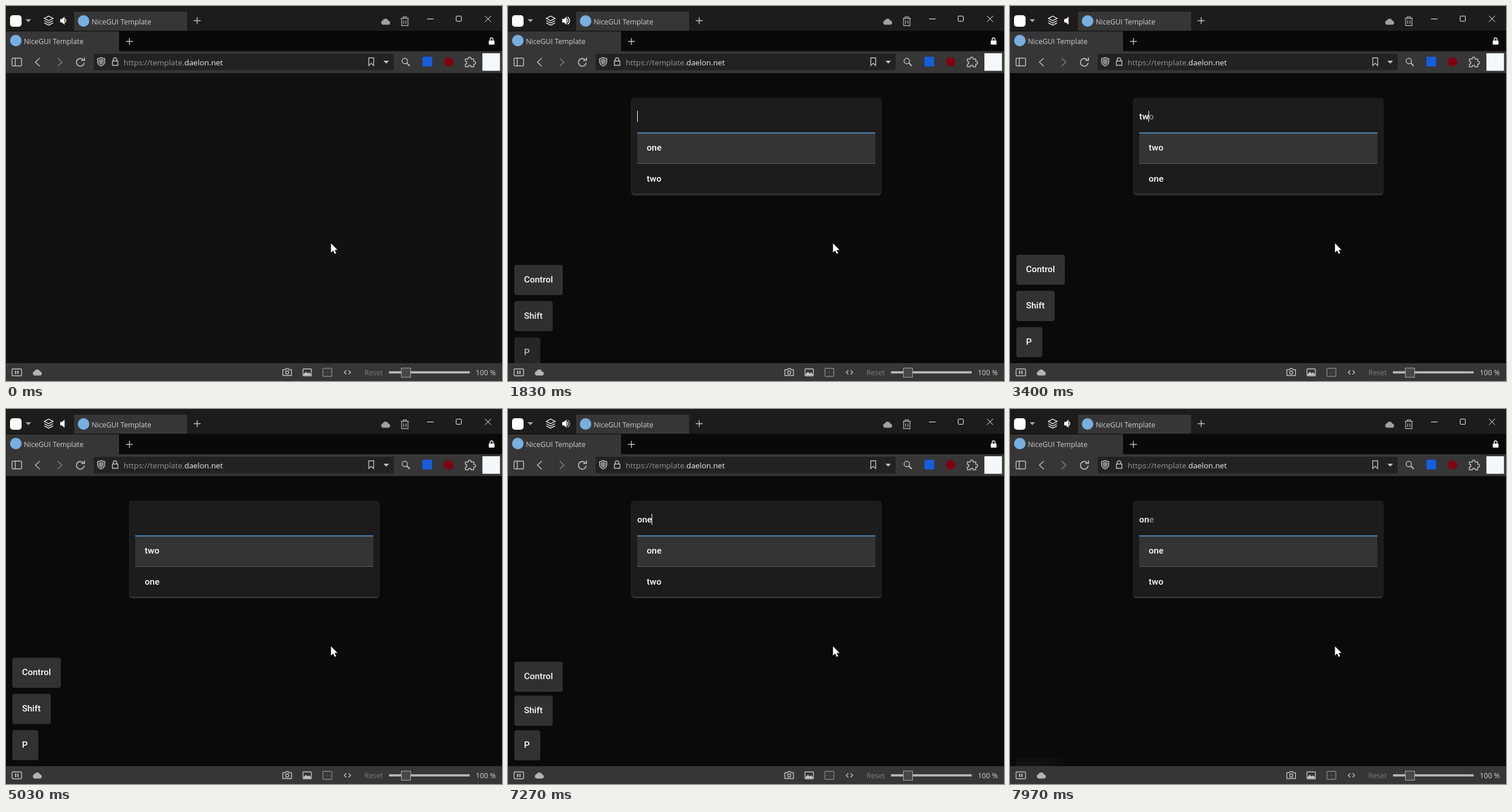
An HTML page that plays this animation: 860 px wide and 651 px high, repeating every 8000 ms.

```html
<!DOCTYPE html>
<html lang="en">
<head>
<meta charset="utf-8">
<title>Command palette</title>
<style>
  html, body { margin: 0; width: 100%; height: 100%; overflow: hidden; background: #111; }
  svg { display: block; }
  .ui { font: 12.4px "Open Sans", "Noto Sans", sans-serif; fill: #d0d0d0; }
  .page { font: 500 15.4px Roboto, sans-serif; fill: #fff; white-space: pre; }
  .line { fill: none; stroke: #c4c4c4; stroke-width: 1.4; }
  .white { stroke: #fff; }
  .dim { stroke: #858585; }
  .thin { stroke-width: 1; }
</style>
</head>
<body>
<svg width="860" height="651" viewBox="0 0 860 651">
  <defs>
    <filter id="shadow" x="-5%" y="-8%" width="110%" height="118%">
      <feDropShadow dx="0" dy="1" stdDeviation="1.5" flood-color="#aaa" flood-opacity=".45"/>
    </filter>
    <path id="cloud" d="M4 11.500a3.800 3.800 0 0 1 0-7.400A5 5 0 0 1 13.400 4.500A3.600 3.600 0 0 1 14 11.500z"/>
    <path id="plus" class="line" d="M-6 0H6M0-6V6"/>
  </defs>

  <!-- page -->
  <rect y="116" width="860" height="504" fill="#111"/>
  <rect id="backdrop" y="116" width="860" height="504" fill="#0a0a0a"/>
  <g id="dialog" class="page">
    <rect x="215" y="160" width="431" height="166.500" rx="4" fill="#1d1d1d" filter="url(#shadow)"/>
    <rect x="224" y="221" width="413" height="52" fill="#343434"/>
    <rect x="224" y="219.500" width="413" height="1.700" fill="#5898d4"/>
    <rect x="224" y="273" width="413" height="1" fill="#5a5a5a"/>
    <text x="224" y="197"><tspan id="typed"></tspan><tspan id="ghost" fill="#8a8a8a"></tspan></text>
    <rect id="caret" y="182" width="1" height="19" fill="#fff"/>
    <text id="first" x="240.600" y="251.300"></text>
    <text id="second" x="240.600" y="304.500"></text>
  </g>
  <g id="chips" class="page"></g>

  <!-- window tabs -->
  <rect width="860" height="43" fill="#1d1c1b"/>
  <rect y="43" width="860" height="36" fill="#0a0907"/>
  <path d="M118 10H314V43H118zM0 44H196V79H0z" fill="#363636"/>
  <rect x="7" y="16" width="20" height="20" rx="5" fill="#fff"/>
  <path d="M34 23h9.500l-4.750 5z" fill="#aaa"/>
  <path d="M74 17.500l7.500 4-7.500 4-7.500-4z" class="line white"/>
  <path d="M66.500 25.500l7.500 4 7.500-4M66.500 29.300l7.500 4 7.500-4" class="line white"/>
  <path d="M94 22.500h3l4.500-4v14l-4.500-4h-3z" fill="#fff"/>
  <path id="innerWave" class="line white" d="M102.500 22.300q2.600 3.200 0 6.400"/>
  <path id="outerWave" class="line white" d="M103.500 19q7 6.500 0 13"/>
  <circle cx="134.500" cy="26" r="10" fill="#78aee0"/>
  <circle cx="17" cy="60" r="10" fill="#78aee0"/>
  <text class="ui" x="148.500" y="31.500">NiceGUI Template</text>
  <text class="ui" x="31" y="65.500">NiceGUI Template</text>
  <use href="#plus" x="331.500" y="25.500"/>
  <use href="#plus" x="214" y="61.500"/>
  <use href="#cloud" x="649.500" y="21" fill="#a0a0a0"/>
  <path class="line" style="stroke:#a8a8a8" d="M684.500 21.500h14M688.500 21v-2h6v2M686 22v12h11V22M689.500 25v6M693.500 25v6"/>
  <path class="line white thin" d="M730 22.500h11.500M830.500 17l10.500 10.500M841 17l-10.500 10.500"/>
  <rect class="line white thin" x="780.500" y="17.500" width="9" height="9" rx="1"/>
  <path class="line white" d="M839.500 60v-2.300a2.500 2.500 0 0 1 5 0V60"/>
  <rect x="837" y="60" width="10" height="7" rx="1" fill="#fff"/>

  <!-- address bar -->
  <rect y="78.500" width="860" height="38" fill="#363636"/>
  <rect x="152" y="83" width="520" height="28.500" fill="#222"/>
  <g class="line">
    <rect x="10.500" y="90.500" width="16.500" height="13.500" rx="2"/>
    <path d="M16 91v13M58.500 90.500L51 97.500l7.500 7"/>
    <path class="dim" d="M89.500 90.500l7.500 7-7.500 7"/>
    <path stroke-width="1.700" d="M134 93.500a6.700 6.700 0 1 0 1.500 5M136 89.500v5h-5.500"/>
    <path d="M165 89.500l6.300 2v4.500q0 5.500-6.300 8.300q-6.300-2.800-6.300-8.300v-4.500z"/>
    <path d="M186 95.500v-2.500a3 3 0 0 1 6 0v2.500M184.500 95.500h9.500v7.500h-9.500z"/>
    <path d="M629 90h8.500v13.500l-4.250-4-4.250 4z"/>
    <circle cx="691.500" cy="95.500" r="4.700"/>
    <path stroke-width="2" d="M695 99l5 5"/>
    <path d="M796.500 92h5a2.600 2.600 0 1 1 5 0h4.500v4a2.600 2.600 0 1 1 0 5v4.500h-4.500a2.500 2.500 0 0 0-5 0h-5v-4.500a2.500 2.500 0 0 0 0-5z"/>
  </g>
  <path d="M165 91.500l4.500 1.500v3q0 4-4.500 6.300q-4.500-2.300-4.500-6.300v-3z" fill="#858585"/>
  <path d="M654.500 95h9.500l-4.750 5z" fill="#c4c4c4"/>
  <text class="ui" x="204" y="102.500" style="font-size:13.400px;fill:#969696">https://template.<tspan fill="#f0f0f0">daelon.net</tspan></text>
  <rect x="722" y="88" width="17" height="17" rx="2" fill="#175ddc"/>
  <circle cx="767.500" cy="97" r="8" fill="#800010"/>
  <rect x="826" y="82" width="30.500" height="30.500" fill="#f4f8fa"/>

  <!-- status bar -->
  <rect y="620" width="860" height="31" fill="#363636"/>
  <g class="line">
    <rect x="10.500" y="630" width="16.500" height="12" rx="2"/>
    <path stroke-width="2" d="M16.700 633v6M20.700 633v6"/>
    <path d="M480 631.500h4l1.500-2h4l1.500 2h4v10h-15z"/>
    <circle cx="487.500" cy="636.200" r="2.700"/>
    <rect x="515" y="630" width="14.500" height="12" rx="1"/>
    <rect class="dim" x="549.500" y="629" width="15.500" height="14" rx="2"/>
    <path class="dim" stroke-dasharray="1 2" stroke-width=".7" d="M550 636h15M557.300 629v14"/>
    <path d="M590 632.500l-3.500 3.500 3.500 3.500M594 632.500l3.500 3.500-3.500 3.500"/>
  </g>
  <path d="M516 641v-2l4-4 3 3 2.500-2 3 3v2z" fill="#c4c4c4"/>
  <use href="#cloud" x="45.500" y="630" fill="#b4b4b4"/>
  <text class="ui" x="621.500" y="640.500" style="fill:#7d7d7d">Reset</text>
  <rect x="664" y="634" width="140" height="4" fill="#b2b2b2"/>
  <rect x="685.500" y="628.500" width="16" height="16" fill="#484848" stroke="#a6a6a6"/>
  <text class="ui" x="814.500" y="640.500">100 %</text>

  <path d="M563.500 412v16l3.700-3.400 2.700 5.700 2.500-1.200-2.700-5.500h5z" fill="#fff"/>
</svg>
<script>
const LOOP = 8000, WAVE_PERIOD = LOOP / 6, BLINK = 530;
const PAGE_BOTTOM = 620, ENTER_TIME = 600, LEAVE_TIME = 800;
const P_PRESSED = 1400, DIALOG_OPENS = 1430, ROW = 62.9;

const chips = [
  { label: "Control", width: 84, top: 431.7, enter: 1235, leave: 7241 },
  { label: "Shift", width: 66.5, top: 494.6, enter: 1265, leave: 7252 },
  { label: "P", width: 45, top: 557.5, enter: P_PRESSED, leave: 7268 },
];

// Each edit: start time, typed text, completion, list order
const edits = [
  [1450, "", "", "one two"],
  [2450, "t", "wo", "two one"],
  [3200, "tw", "o", "two one"],
  [4480, "", "", "two one"],
  [5600, "o", "ne", "one two"],
  [6300, "on", "e", "one two"],
  [6900, "one", "", "one two"],
  [7950, "on", "e", "one two"],
];

const el = id => document.getElementById(id);
const ramp = (t, start, end) => Math.min(1, Math.max(0, (t - start) / (end - start)));
const easeOut = p => 1 - (1 - p) ** 3;

for (const chip of chips) {
  el("chips").insertAdjacentHTML("beforeend",
    `<g><rect x="11" width="${chip.width}" height="52.300" rx="4" fill="#323232"/>
     <text x="27.700" y="30.700">${chip.label}</text></g>`);
  chip.node = el("chips").lastElementChild;
}

function drawWaves(t) {
  const p = t % WAVE_PERIOD;
  const inner = p < 730 ? 1 - ramp(p, 610, 730) : ramp(p, 1000, 1250);
  const outer = ramp(p, 120, 450) * (1 - ramp(p, 530, 700));
  el("innerWave").setAttribute("opacity", inner);
  el("outerWave").setAttribute("opacity", outer);
}

function drawChips(t) {
  const rise = ROW * (1 - ramp(t, P_PRESSED, P_PRESSED + ENTER_TIME));
  for (const { node, top, enter, leave } of chips) {
    const gone = ramp(t, leave, leave + LEAVE_TIME);
    const y = top + gone * (PAGE_BOTTOM - top) + rise;
    node.setAttribute("transform", `translate(0 ${y})`);
    node.setAttribute("opacity", ramp(t, enter, enter + ENTER_TIME) * (1 - gone));
  }
}

function drawDialog(t) {
  const open = easeOut(ramp(t, DIALOG_OPENS, DIALOG_OPENS + 300));
  el("backdrop").setAttribute("opacity", open);
  el("dialog").setAttribute("opacity", open);
  el("dialog").setAttribute("transform",
    `translate(430.5 243.5) scale(${open}) translate(-430.5 -243.5)`);

  const [start, typed, ghost, order] = edits.findLast(e => e[0] <= t) || edits[0];
  const [first, second] = order.split(" ");
  el("typed").textContent = typed;
  el("ghost").textContent = ghost;
  el("first").textContent = first;
  el("second").textContent = second;

  const width = typed ? el("typed").getComputedTextLength() : 0;
  const caretOn = start < 7900 && (t - start) % (2 * BLINK) < BLINK;
  el("caret").setAttribute("x", 224 + Math.floor(width));
  el("caret").setAttribute("opacity", caretOn ? 1 : 0);
}

function draw() {
  const t = performance.now() % LOOP;
  drawWaves(t);
  drawChips(t);
  drawDialog(t);
  requestAnimationFrame(draw);
}
draw();
</script>
</body>
</html>
```
